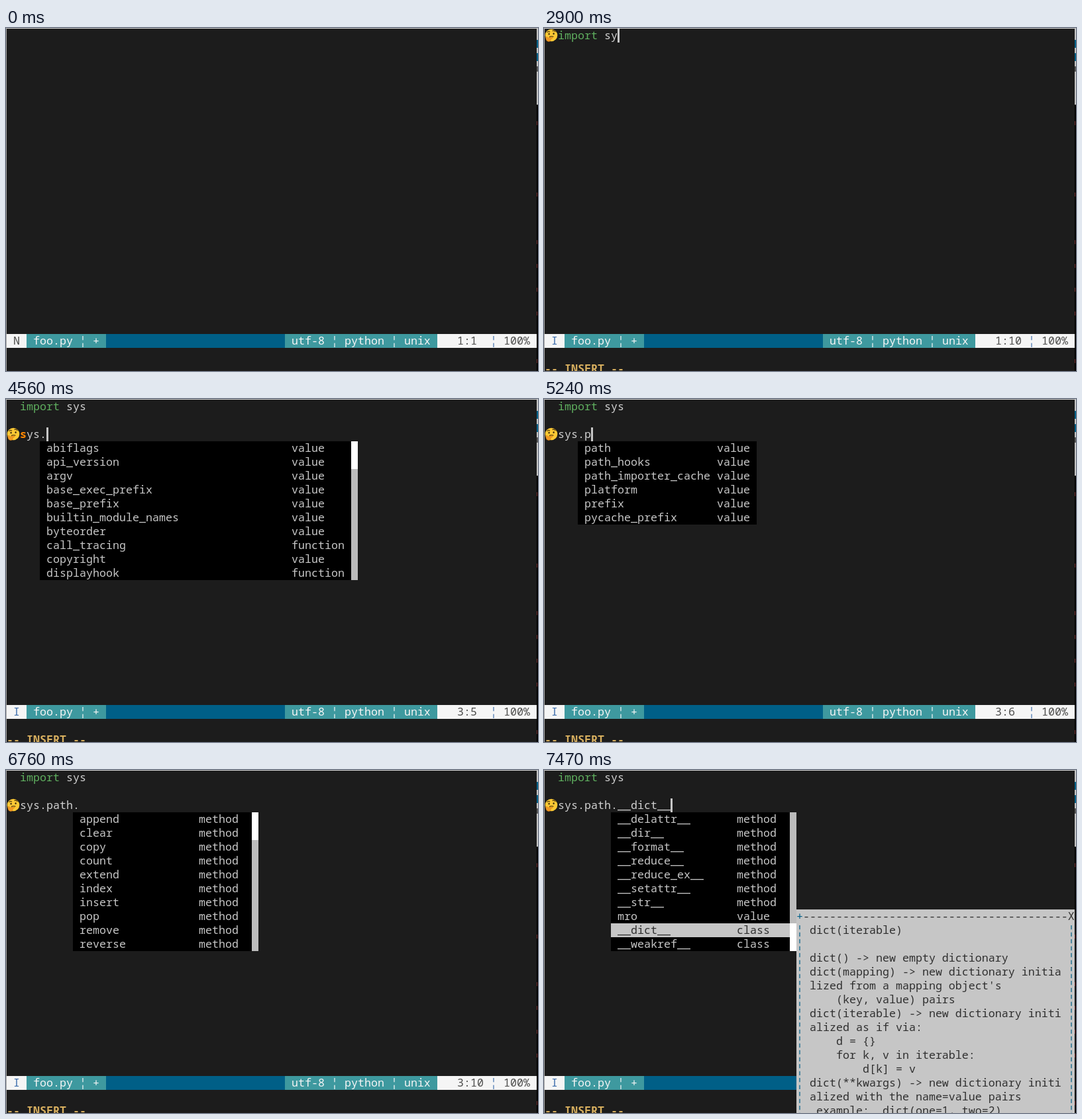
Recreate the animation shown at these times as an HTML page. Size 803 by 519 pixels, loop 8 s.

```html
<!DOCTYPE html>
<html lang="en">
<head>
<meta charset="utf-8">
<title>Completion in a terminal editor</title>
<style>
  html, body { margin: 0; width: 100%; height: 100%; overflow: hidden; background: #1c1c1c; }
  svg { display: block; }
  text { font: 16.6667px "Noto Sans Mono", "DejaVu Sans Mono", monospace; white-space: pre; font-variant-ligatures: none; }
  .bold { font-weight: 700; }
</style>
</head>
<body>
<svg id="stage" width="803" height="519" viewBox="0 0 803 519">
  <defs>
    <g id="thinking">
      <circle cx="10" cy="10" r="9.3" fill="#fcc934"/>
      <path d="M3.5 5.6Q5.5 3.6 8 4.9M11.5 3.4Q14.5 2.2 16.4 4.8" fill="none" stroke="#5a4210" stroke-width="1.3"/>
      <ellipse cx="6.6" cy="8" rx="1.2" ry="1.5" fill="#46350f"/>
      <ellipse cx="13.6" cy="7.6" rx="1.2" ry="1.5" fill="#46350f"/>
      <path d="M7 12.6Q10 11 13.4 12.2" fill="none" stroke="#5a4210" stroke-width="1.3"/>
      <path d="M2 12.4Q4 11.4 4.4 14L11.5 13Q13 14 11 14.8L9 15.5Q10 19.6 5.6 19.4Q1.2 18.6 2 12.4Z" fill="#f09a24" stroke="#d47a12" stroke-width=".5"/>
    </g>
  </defs>
  <g id="edges"></g>
  <g id="screen"></g>
</svg>
<script>
const CELL = 10, LINE = 21, LOOP = 8000;
const BACK = '#1c1c1c', TEXT = '#d0d0d0', LIGHT = '#c6c6c6', DARK = '#303030', BLUE = '#005f87', TEAL = '#3e999f', PALE = '#f5f5f5';

const px = col => 1 + col * CELL;
const py = row => 1 + row * LINE;
const rect = (x, y, w, h, fill) => `<rect x="${x}" y="${y}" width="${w}" height="${h}" fill="${fill}"/>`;
const block = (col, row, cols, rows, fill) => rect(px(col), py(row), cols * CELL, rows * LINE, fill);
const escape = s => s.replace(/&/g, '&amp;').replace(/</g, '&lt;').replace(/>/g, '&gt;');
const write = (col, row, s, fill = TEXT, cls = '') =>
  `<text x="${px(col)}" y="${py(row) + 16}" fill="${fill}" class="${cls}">${escape(s)}</text>`;

const items = (kind, names) => names.split(' ').map(name => [name, kind]);
const sysMenu = {
  col: 5, width: 48, kindCol: 38, thumb: 0,
  items: [
    ...items('value', 'abiflags api_version argv base_exec_prefix base_prefix builtin_module_names byteorder'),
    ...items('function', 'call_tracing'), ...items('value', 'copyright'), ...items('function', 'displayhook')
  ]
};
const pMenu = {
  col: 5, width: 27, kindCol: 21,
  items: items('value', 'path path_hooks path_importer_cache platform prefix pycache_prefix')
};
const pathMenu = { ...pMenu, items: pMenu.items.slice(0, 3) };
const listMenu = {
  col: 10, width: 28, kindCol: 19, thumb: 0,
  items: items('method', 'append clear copy count extend index insert pop remove reverse')
};
const tailMenu = {
  ...listMenu, thumb: 8,
  items: [
    ...items('method', '__delattr__ __dir__ __format__ __reduce__ __reduce_ex__ __setattr__ __str__'),
    ...items('value', 'mro'), ...items('class', '__dict__ __weakref__')
  ]
};

const objectDoc = { row: 11, lines: `object()

The base class of the class hierarchy.

When called, it accepts no arguments a
nd returns a new featureless
instance that has no instance attribut
es and cannot be given any.`.split('\n') };
const dictDoc = { row: 10, lines: `dict(iterable)

dict() -> new empty dictionary
dict(mapping) -> new dictionary initia
lized from a mapping object's
    (key, value) pairs
dict(iterable) -> new dictionary initi
alized as if via:
    d = {}
    for k, v in iterable:
        d[k] = v
dict(**kwargs) -> new dictionary initi
alized with the name=value pairs
 example:  dict(one=1, two=2)
`.split('\n') };

// Each step lists only what changes at that time.
const steps = [
  [0, { mode: 'N', row: 0, text: '', cursor: '' }],
  [120, { cursor: 'block' }],
  [620, { mode: 'I', cursor: 'bar' }],
  [1030, { text: 'i' }],
  [1180, { text: 'im' }],
  [1470, { text: 'impo' }],
  [1590, { text: 'impor' }],
  [1740, { text: 'import' }],
  [2030, { sign: 0 }],
  [2750, { text: 'import s' }],
  [2900, { text: 'import sy' }],
  [3180, { text: 'import sys', sign: null }],
  [3380, { row: 1, text: '' }],
  [3580, { row: 2 }],
  [3780, { text: 's' }],
  [3980, { text: 'sys' }],
  [4260, { text: 'sys.', sign: 2, fault: true }],
  [4560, { menu: sysMenu }],
  [4970, { text: 'sys.p', fault: false, menu: null }],
  [5240, { menu: pMenu }],
  [5380, { text: 'sys.pa', menu: pathMenu }],
  [5530, { text: 'sys.pat' }],
  [5670, { text: 'sys.path' }],
  [6120, { text: 'sys.path.', menu: null }],
  [6390, { menu: listMenu }],
  [6760, { cursor: '' }],
  [7050, { text: 'sys.path.__weakref__', cursor: 'bar', menu: tailMenu, picked: 9, doc: objectDoc, place: '3:10', shade: true }],
  [7200, { place: null, shade: false }],
  [7470, { text: 'sys.path.__dict__', picked: 8, doc: dictDoc }]
];
let merged = {};
const states = steps.map(([time, change]) => ({ time, ...(merged = { ...merged, ...change }) }));

function codeLine(row, s, fault) {
  if (s.startsWith('import')) return write(2, row, 'import', '#5faf5f') + write(8, row, s.slice(6));
  if (fault) return write(2, row, s[0], '#ff8700', 'bold') + write(3, row, s.slice(1));
  return write(2, row, s);
}

function statusBar({ mode, row, text, place }) {
  const ink = '#4d4d4c', accent = '#4271ae';
  return block(0, 22, 80, 1, BLUE) + block(0, 22, 3, 1, PALE) + block(3, 22, 12, 1, TEAL) +
    block(42, 22, 23, 1, TEAL) + block(65, 22, 15, 1, PALE) +
    write(1, 22, mode, mode === 'I' ? accent : ink) +
    write(4, 22, 'foo.py ¦ +', PALE) + write(43, 22, 'utf-8 ¦ python ¦ unix', PALE) +
    write(68, 22, place || `${row + 1}:${text.length + 1}`, ink) +
    write(73, 22, '¦', accent) + write(75, 22, '100%', ink);
}

function menuBox({ col, width, kindCol, thumb, items }, picked, shade) {
  const scrolls = thumb !== undefined;
  let out = block(col, 3, width, items.length, shade ? '#151515' : '#000');
  items.forEach(([name, kind], i) => {
    const on = i === picked, fill = on ? DARK : LIGHT;
    if (on) out += block(col, 3 + i, width - 1, 1, LIGHT);
    out += write(col + 1, 3 + i, name, fill) + write(col + kindCol, 3 + i, kind, fill);
  });
  if (scrolls) {
    out += block(col + width - 1, 3, 1, items.length, '#bcbcbc') +
      block(col + width - 1, 3 + thumb, 1, 2, '#fff');
  }
  return out;
}

function docBox({ row, lines }) {
  const last = row + lines.length + 1, dashes = '-'.repeat(40);
  const edge = (at, corner) => write(38, at, '+', BLUE) + write(39, at, dashes + corner, DARK);
  return block(38, row, 42, lines.length + 2, LIGHT) + edge(row, 'X') + edge(last, '@') +
    lines.map((line, i) => {
      const at = row + 1 + i;
      return write(38, at, '¦', BLUE) + write(40, at, line, DARK) + write(79, at, '¦', BLUE);
    }).join('');
}

function render(s) {
  let out = s.shade ? rect(101, 43, 700, 420, '#151515') : '';
  if (s.row > 0) out += codeLine(0, 'import sys');
  if (s.text) out += codeLine(s.row, s.text, s.fault);
  if (s.sign != null) out += `<use href="#thinking" x="1" y="${py(s.sign)}"/>`;
  if (s.cursor) out += rect(px(2 + s.text.length), py(s.row), s.cursor === 'bar' ? 3 : CELL, LINE, LIGHT);
  out += statusBar(s);
  if (s.mode === 'I') out += write(0, 24, '-- INSERT --', '#d7af5f', 'bold');
  if (s.menu) out += menuBox(s.menu, s.picked, s.shade);
  if (s.doc) out += docBox(s.doc);
  return out;
}

document.getElementById('edges').innerHTML =
  rect(0, 0, 803, 519, BACK) + rect(0, 0, 803, 1, '#d8d8d8') + rect(0, 0, 1, 519, '#a8a8a8') +
  rect(801, 0, 2, 519, '#000') + rect(801, 0, 2, 116, '#c4c4c4') + rect(801, 18, 2, 32, BLUE) +
  rect(801, 30, 2, 8, '#c4c4c4') + rect(801, 58, 2, 8, '#555') +
  [4, 7, 9, 10, 11, 12, 14].map(n => rect(801, n * 36 - 3, 1, 6, '#6b2424')).join('');

const screen = document.getElementById('screen');
const start = performance.now();
let shown;
function tick() {
  const time = (performance.now() - start) % LOOP;
  const state = states.findLast(s => s.time <= time);
  if (state !== shown) {
    screen.innerHTML = render(state);
    shown = state;
  }
  requestAnimationFrame(tick);
}
tick();
</script>
</body>
</html>
```
